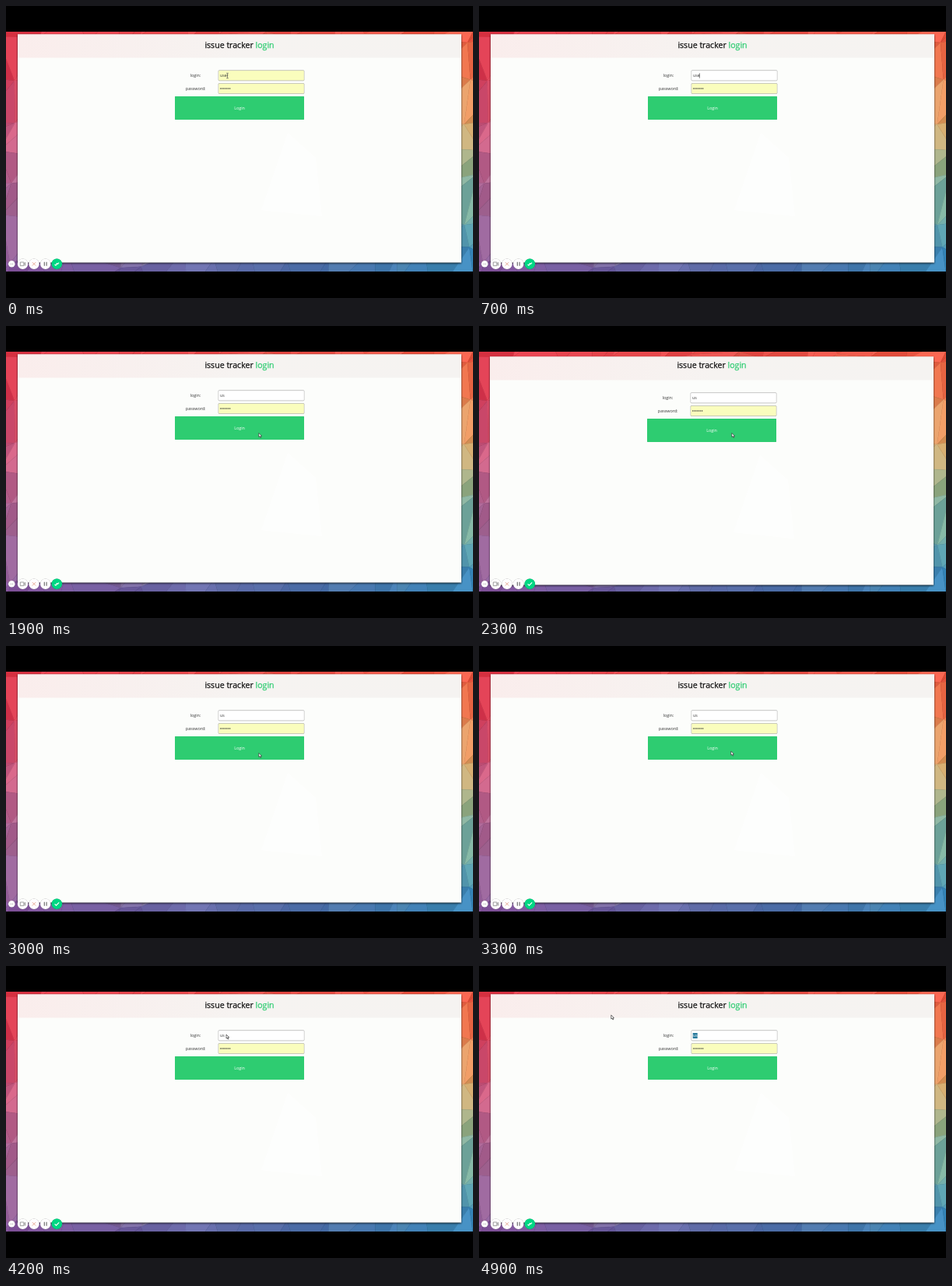
Write an HTML page that moves like this. It is 600 px wide and 375 px high and loops after 5 s.

```html
<!DOCTYPE html>
<html lang="en">
<head>
<meta charset="utf-8">
<title>Login</title>
<style>
  html, body { margin: 0; height: 100%; overflow: hidden; background: #000; }
  svg { display: block; width: 100%; height: 100%; }
  text { font: 5.4px "Open Sans", sans-serif; fill: #333; white-space: pre; }
  #title text { font-size: 10.6px; fill: #111; stroke: #111; stroke-width: .25; }
  #title tspan { fill: #2ecc71; stroke: #2ecc71; }
  .mid { text-anchor: middle; }
  .field { fill: #fafdbd; stroke: #bbb; stroke-width: .4; }
  .shade { filter: drop-shadow(.3px .9px .6px #0007); }
  .line { fill: none; stroke: #888; stroke-width: .8; }
</style>
</head>
<body>
<svg viewBox="0 0 600 375">
  <clipPath id="screen"><rect y="33" width="600" height="308"/></clipPath>
  <linearGradient id="tint">
    <stop stop-color="#faedec"/><stop offset=".5" stop-color="#f6f3f1"/><stop offset="1" stop-color="#f5f3f1"/>
  </linearGradient>
  <rect width="600" height="375"/>
  <g clip-path="url(#screen)">
    <g id="mesh"></g>
    <g id="panel">
      <rect x="15" y="36.5" width="570" height="293" fill="#fcfdfb" style="filter:drop-shadow(.7px 1px 1px #000c)"/>
      <path d="M362 163L398 195 406 270 328 262Z" fill="#fff" opacity=".6"/>
      <rect x="15" y="36.5" width="570" height="30" fill="url(#tint)"/>
      <text class="mid" x="243.5" y="91">login:</text>
      <text class="mid" x="243.7" y="107.8">password:</text>
      <g class="shade"><rect class="field" id="login" x="273" y="82.8" width="110" height="13" rx="1"/></g>
      <g class="shade"><rect class="field" x="273" y="99.5" width="110" height="13" rx="1"/></g>
      <rect id="select" x="274.7" y="86" width="6" height="7" fill="#287a9c"/>
      <text id="name" x="275" y="91.4" style="font-size:5.2px"></text>
      <path id="caret" d="M0 86.3v6.4" stroke="#222" stroke-width=".6"/>
      <path d="M275.7 106h12.2" stroke="#333" stroke-width="1.4" stroke-linecap="round" stroke-dasharray="0 2"/>
      <g class="shade"><rect x="217" y="116" width="166" height="30" rx="1" fill="#2ecc71"/></g>
      <text class="mid" x="300" y="133" style="fill:#fff">Login</text>
    </g>
    <g id="title"><text class="mid" x="300" y="53.8">issue tracker <tspan>login</tspan></text></g>
    <g id="tools" class="shade">
      <g fill="#fff">
        <circle cx="7.3" cy="331.3" r="4.3"/><circle cx="21.5" cy="331.3" r="6.7"/>
        <circle cx="36" cy="331.3" r="6.7"/><circle cx="50.7" cy="331.3" r="6.7"/>
      </g>
      <circle cx="65.3" cy="331.3" r="6.8" fill="#00d783"/>
    </g>
    <path class="line" d="M5.4 331.3h.8m.7 0h.8m.7 0h.8M18.3 329h4.6v4.6h-4.6zM22.9 331l2-1.5v3.7l-2-1.5"/>
    <path class="line" d="M33.8 329.1l4.4 4.4m0-4.4l-4.4 4.4" style="stroke:#e29a80"/>
    <path class="line" d="M49.3 328.8v5m2.8-5v5" style="stroke:#666;stroke-width:1.1"/>
    <path class="line" id="mark" style="stroke:#fff;stroke-width:1.2"/>
    <path id="beam" class="line" d="M283 86.3h3m-1.5 0v6.4m-1.5 0h3" style="stroke:#555;stroke-width:.6"/>
    <path id="mouse" d="M0 0V5L1.2 4 2.1 6 3 5.6 2.2 3.7H3.7Z" fill="#fff" stroke="#333" stroke-width=".7"/>
  </g>
</svg>
<script>
const $ = id => document.getElementById(id);
const show = (id, on) => $(id).setAttribute('visibility', on ? 'visible' : 'hidden');
const move = (id, x, y) => $(id).setAttribute('transform', `translate(${x} ${y})`);

// Faceted backdrop: colour stops down the left and right edges, blended across
const left = [[224, 58, 76], [218, 65, 91], [204, 88, 127], [186, 105, 151], [158, 99, 150], [132, 84, 156]];
const right = [[239, 91, 70], [237, 130, 80], [213, 168, 105], [142, 181, 144], [99, 168, 176], [58, 137, 188]];
let seed = 7;
const rand = () => (seed = seed * 16807 % 2147483647) / 2147483647;
const mix = (a, b, k) => a + (b - a) * k;

function shade(x, y) {
  const v = Math.min(4.99, Math.max(0, (y - 33) / 308 * 5)), i = Math.floor(v);
  const u = Math.min(1, Math.max(0, x / 600)), light = (rand() - .5) * 30;
  return 'rgb(' + [0, 1, 2].map(c => Math.round(light + mix(
    mix(left[i][c], left[i + 1][c], v - i), mix(right[i][c], right[i + 1][c], v - i), u))) + ')';
}

const cell = 46, grid = [];
for (let r = 0; r < 9; r++)
  grid.push(Array.from({ length: 16 }, (_, c) =>
    [(c - 1) * cell + (rand() - .5) * 30, r * cell + (rand() - .5) * 30]));
let facets = '';
const facet = (...p) => {
  const mean = i => (p[0][i] + p[1][i] + p[2][i]) / 3, fill = shade(mean(0), mean(1));
  facets += `<path d="M${p.join('L')}Z" fill="${fill}" stroke="${fill}" stroke-width=".5"/>`;
};
for (let r = 0; r < 8; r++)
  for (let c = 0; c < 15; c++) {
    const a = grid[r][c], b = grid[r][c + 1], d = grid[r + 1][c], e = grid[r + 1][c + 1];
    facet(a, b, d);
    facet(b, e, d);
  }
$('mesh').innerHTML = facets;

// Pointer stops: time, x, y
const path = [[1300, 284, 89], [1800, 324.8, 137.5], [3200, 324.8, 137.5], [3600, 318.3, 122.3],
  [4000, 283, 88], [4300, 283, 88], [4900, 169.8, 63]];
const shakes = [[1, -1], [2, 1], [-1, 3], [1, -2], [-2, 1], [1, 0]];

function pointer(t) {
  let i = 0;
  while (i < path.length - 2 && t >= path[i + 1][0]) i++;
  const [a, b] = [path[i], path[i + 1]];
  let k = Math.min(1, Math.max(0, (t - a[0]) / (b[0] - a[0])));
  k = k * k * (3 - 2 * k);
  return [mix(a[1], b[1], k), mix(a[2], b[2], k)];
}

function draw(now) {
  const t = Math.floor(now % 5000 / 100) * 100;
  const [dx, dy] = shakes[(t - 2100) / 100] || [0, 0];
  move('panel', dx, dy);
  move('title', dx, 0);

  const text = t < 500 ? 'user' : t < 1000 ? 'use' : 'us';
  const selected = t >= 4400;
  $('name').textContent = text;
  $('name').style.fill = selected ? '#fff' : '#333';
  $('login').style.fill = t < 500 ? '#fafdbd' : '#fff';
  show('select', selected);
  show('caret', t >= 500 && t < 1300);
  move('caret', t < 1000 ? 283.3 : 281, 0);

  show('beam', t < 500);
  show('mouse', t >= 1300);
  move('mouse', ...pointer(t));
  $('mark').setAttribute('d', t >= 2100 && t < 4300
    ? 'M62.6 331.3l1.9 1.9 3.7-3.8' : 'M62.5 332l1.5 1.2 1.3-2.5 1 .8 1.8-1.8');
  requestAnimationFrame(draw);
}
requestAnimationFrame(draw);
</script>
</body>
</html>
```
